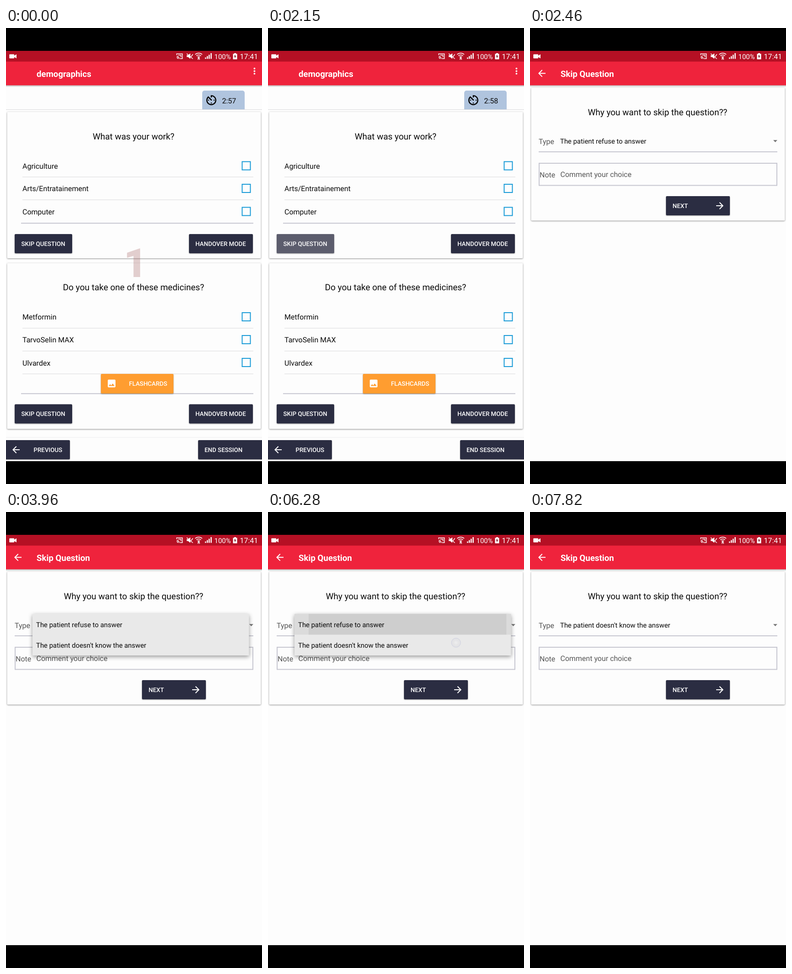
Recreate the animation shown at these times as an HTML page. Size 561x998 px, loop 8000 ms.

```html
<!DOCTYPE html>
<html lang="en">
<head>
<meta charset="utf-8">
<title>Questionnaire</title>
<style>
html, body { margin: 0; width: 100%; height: 100%; overflow: hidden; background: #000; }
svg { display: block; }
text { font: 16px Roboto, sans-serif; fill: #0a0a0a; }
.title { font-size: 18.7px; font-weight: 700; fill: #fff; }
.ask { font-size: 19px; text-anchor: middle; }
.cap { font-size: 13.35px; font-weight: 500; fill: #fff; }
.opt { font-size: 14.9px; }
.lab { fill: #555; }
.white { fill: #fff; }
.card { fill: #fdfdfd; filter: drop-shadow(0 1px 1.5px rgba(0,0,0,.45)); }
.btn { fill: #2b2d42; filter: drop-shadow(0 1px 1px rgba(0,0,0,.4)); }
.box { fill: none; stroke: #1a9bd7; stroke-width: 2; }
.rule { stroke: #d9d9dc; stroke-width: 1.2; }
.end { stroke: #c6c6d0; stroke-width: 2; }

.count, .old, .new, .press, .page, .menu, .tap, .hold, .ripple, .second, .first, .pick {
  animation: 8s linear infinite;
}
.count { animation-name: count; }
.old { animation-name: old; }
.new { animation-name: new; }
.press { animation-name: press; transform-origin: 106px 460px; }
.page { animation-name: page; }
.menu { animation-name: menu; }
.tap1 { animation-name: tap1; }
.tap2 { animation-name: tap2; }
.drag { animation-name: drag; }
.tap3 { animation-name: tap3; }
.hold { animation-name: hold; }
.ripple { animation-name: ripple; transform-origin: 412px 246px; }
.second { animation-name: second; }
.first { animation-name: first; }
.pick { animation-name: pick; }

@keyframes count { 0%, .49% { opacity: 1 } .5%, 1.12% { opacity: .4 } 1.125%, 100% { opacity: 0 } }
@keyframes old { 0%, 19.24% { opacity: 1 } 19.25%, 100% { opacity: 0 } }
@keyframes new { 0%, 19.24% { opacity: 0 } 19.25%, 100% { opacity: 1 } }
@keyframes press {
  0%, 19.5% { opacity: 0; transform: scale(0) }
  19.6% { opacity: 1; transform: scale(.1) }
  23.5%, 30% { opacity: 1; transform: scale(1) }
  31%, 100% { opacity: 0; transform: scale(1) }
}
@keyframes page {
  0%, 27.5% { opacity: 0; transform: translateY(37px); animation-timing-function: cubic-bezier(.36,.66,.04,1) }
  30.6%, 100% { opacity: 1; transform: none }
}
@keyframes menu { 0%, 43.75% { opacity: 0 } 46.5%, 94.5% { opacity: 1 } 97.25%, 100% { opacity: 0 } }
@keyframes tap1 { 0%, 19.24% { opacity: 0 } 19.25%, 21.5% { opacity: 1 } 23%, 100% { opacity: 0 } }
@keyframes tap2 { 0%, 38.99% { opacity: 0 } 39%, 41.5% { opacity: 1 } 43%, 100% { opacity: 0 } }
@keyframes drag {
  0%, 68.12% { opacity: 0; transform: translateY(-30px) }
  68.13%, 72% { opacity: 1; transform: translateY(-30px) }
  78%, 79% { opacity: 1; transform: none }
  84.5% { opacity: 1; transform: translateY(50px) }
  86.25%, 100% { opacity: 0; transform: translateY(52px) }
}
@keyframes tap3 { 0%, 92.24% { opacity: 0 } 92.25%, 94% { opacity: 1 } 95%, 100% { opacity: 0 } }
@keyframes hold { 0%, 68.5% { opacity: 0 } 70%, 79% { opacity: 1 } 82.5%, 100% { opacity: 0 } }
@keyframes ripple {
  0%, 69% { opacity: 0; transform: scaleX(.1) }
  70% { opacity: 1; transform: scaleX(.2) }
  77%, 79% { opacity: 1; transform: none }
  82.5%, 100% { opacity: 0; transform: none }
}
@keyframes second { 0%, 92.25% { opacity: 0 } 93.25%, 100% { opacity: 1 } }
@keyframes first { 0%, 94.49% { opacity: 1 } 94.5%, 100% { opacity: 0 } }
@keyframes pick { 0%, 94.49% { opacity: 0 } 94.5%, 100% { opacity: 1 } }
</style>
</head>
<body>
<svg width="561" height="998" viewBox="0 0 561 998" text-rendering="geometricPrecision">
  <defs>
    <clipPath id="screen"><rect y="73" width="561" height="875"/></clipPath>
    <clipPath id="skip"><rect x="19" y="451" width="126" height="42" rx="2"/></clipPath>
    <linearGradient id="shade" x2="0" y2="1">
      <stop stop-color="#000" stop-opacity=".25"/><stop offset="1" stop-color="#000" stop-opacity="0"/>
    </linearGradient>
    <radialGradient id="glow">
      <stop stop-color="#f0f0f0" stop-opacity=".85"/>
      <stop offset=".5" stop-color="#e4e4e6" stop-opacity=".7"/>
      <stop offset="1" stop-color="#dcdce0" stop-opacity=".45"/>
    </radialGradient>
    <circle id="dot" r="10" fill="url(#glow)" stroke="#c6c9de" stroke-opacity=".75"/>
    <path id="arrow" fill="#fff" d="M8-1H-4.17L1.42-6.59 0-8-8 0 0 8 1.41 6.59-4.17 1H8z"/>
    <rect id="check" class="box" x="517.5" y="-9" width="18" height="18"/>
    <g id="bar">
      <rect y="73" width="561" height="52.5" fill="#ef233c"/>
      <rect y="125.5" width="561" height="4" fill="url(#shade)"/>
    </g>
    <g id="actions">
      <rect class="btn" x="19" y="0" width="126" height="42" rx="2"/>
      <rect class="btn" x="401" y="0" width="140" height="42" rx="2"/>
    </g>
    <g id="actionText">
      <text class="cap" x="33.5" y="25.7">SKIP QUESTION</text>
      <text class="cap" x="415" y="25.7">HANDOVER MODE</text>
    </g>
  </defs>

  <g clip-path="url(#screen)">
    <rect y="73" width="561" height="875" fill="#fdfdfd"/>
    <use href="#bar"/>
    <text class="title" x="67" y="106.5">demographics</text>
    <g fill="#fff">
      <circle cx="544.5" cy="88.7" r="1.9"/><circle cx="544.5" cy="94.3" r="1.9"/><circle cx="544.5" cy="99.9" r="1.9"/>
    </g>

    <path d="M430 178V142a5 5 0 0 1 5-5H518a5 5 0 0 1 5 5V178z" fill="#b0c4de"/>
    <path transform="translate(435.3 143.4) scale(1.22)" d="M11 17c0 .55.45 1 1 1s1-.45 1-1-.45-1-1-1-1 .45-1 1zm0-14v4h2V5.08c3.39.49 6 3.39 6 6.92 0 3.87-3.13 7-7 7s-7-3.13-7-7c0-1.68.59-3.22 1.58-4.42L12 13l1.41-1.41-6.8-6.8v.02C4.42 6.45 3 9.05 3 12c0 4.97 4.02 9 9 9 4.97 0 9-4.03 9-9s-4.03-9-9-9h-1zm7 9c0-.55-.45-1-1-1s-1 .45-1 1 .45 1 1 1 1-.45 1-1zM6 12c0 .55.45 1 1 1s1-.45 1-1-.45-1-1-1-1 .45-1 1z"/>
    <text class="old" x="473.5" y="165">2:57</text>
    <text class="new" x="473.5" y="165">2:58</text>
    <path class="rule" d="M0 178.5H561"/>

    <rect class="card" x="2.5" y="183.5" width="556" height="320.5" rx="2"/>
    <text class="ask" x="279.5" y="243.5">What was your work?</text>
    <text x="36" y="307.5">Agriculture</text>
    <text x="36" y="357.3">Arts/Entratainement</text>
    <text x="36" y="407.7">Computer</text>
    <use href="#check" y="301.5"/><use href="#check" y="351"/><use href="#check" y="401.5"/>
    <path class="rule" d="M36 326H542M36 376H542"/>
    <path class="end" d="M33 427.3H542"/>
    <use href="#actions" y="451"/>
    <g clip-path="url(#skip)"><circle class="press" cx="106" cy="460" r="100" fill="#fff" fill-opacity=".23"/></g>
    <use href="#actionText" y="451"/>

    <rect class="card" x="2.5" y="514.5" width="556" height="363" rx="2"/>
    <text class="ask" x="279.5" y="574">Do you take one of these medicines?</text>
    <text x="36" y="638">Metformin</text>
    <text x="36" y="688">TarvoSelin MAX</text>
    <text x="36" y="738.5">Ulvardex</text>
    <use href="#check" y="632"/><use href="#check" y="682"/><use href="#check" y="732"/>
    <path class="rule" d="M36 657H542M36 707H542M36 757H542"/>
    <path class="end" d="M33 800.3H542"/>
    <rect class="btn" x="208" y="757" width="159" height="43" rx="2" style="fill:#ff9d30"/>
    <path transform="translate(220.2 766.7) scale(.94)" fill="#fff" d="M21 19V5c0-1.1-.9-2-2-2H5c-1.1 0-2 .9-2 2v14c0 1.1.9 2 2 2h14c1.1 0 2-.9 2-2zM8.5 13.5l2.5 3.01L14.5 12l4.5 6H5l3.5-4.5z"/>
    <text class="cap" x="269.5" y="783.2">FLASHCARDS</text>
    <use href="#actions" y="823.5"/>
    <use href="#actionText" y="823.5"/>

    <path d="M0 896H561" stroke="#ececee"/>
    <rect class="btn" x="-3" y="902" width="143" height="42" rx="2"/>
    <rect class="btn" x="421" y="902" width="143" height="42" rx="2"/>
    <use href="#arrow" x="22" y="923"/>
    <text class="cap" x="60.5" y="927.8">PREVIOUS</text>
    <text class="cap" x="435" y="927.8">END SESSION</text>

    <text class="count" x="283.5" y="544.5" text-anchor="middle" style="font-size:88px;font-weight:900;fill:#9a5050;fill-opacity:.27">1</text>
    <g class="tap tap1"><use href="#dot" x="106" y="460"/></g>

    <g class="page">
      <rect y="73" width="561" height="912" fill="#fdfdfd"/>
      <use href="#bar"/>
      <use href="#arrow" x="26" y="99.3"/>
      <text class="title" x="67" y="106.5">Skip Question</text>

      <rect class="card" x="2.5" y="130.5" width="556" height="291" rx="2"/>
      <text class="ask" x="279.5" y="191">Why you want to skip the question??</text>
      <text class="lab" x="19" y="253.5">Type</text>
      <text class="opt first" x="66" y="253.3">The patient refuse to answer</text>
      <text class="opt pick" x="66" y="253.3">The patient doesn't know the answer</text>
      <path d="M533 245.3H542L537.5 250z" fill="#757575"/>
      <path class="end" d="M19 271H542"/>
      <rect x="20" y="296" width="521" height="48.5" fill="none" class="end"/>
      <text class="lab" x="21" y="326.5">Note</text>
      <text class="lab" x="66.5" y="326">Comment your choice</text>
      <rect class="btn" x="298" y="368" width="140" height="42" rx="2"/>
      <text class="cap" x="312.5" y="393.8">NEXT</text>
      <use href="#arrow" transform="translate(416 389) scale(-1 1)"/>

      <g class="menu">
        <rect x="58" y="223" width="474.5" height="91" fill="#e9e9e9" style="filter:drop-shadow(0 3px 5px rgba(0,0,0,.4))"/>
        <rect class="hold" x="58" y="223" width="474.5" height="45.5" fill-opacity=".06"/>
        <rect class="ripple" x="89" y="223" width="433.5" height="45.5" fill-opacity=".06"/>
        <rect class="second" x="58" y="268.5" width="474.5" height="45.5" fill-opacity=".1"/>
        <text class="opt" x="66" y="252.2">The patient refuse to answer</text>
        <text class="opt" x="66" y="297.2">The patient doesn't know the answer</text>
      </g>
      <g class="tap tap2"><use href="#dot" x="412" y="248"/></g>
      <g class="tap drag"><use href="#dot" x="412" y="286"/></g>
      <g class="tap tap3"><use href="#dot" x="412" y="292"/></g>
    </g>
  </g>

  <rect y="50" width="561" height="23.5" fill="#b51024"/>
  <g fill="#fff">
    <path d="M8.5 57.5H17a1.2 1.2 0 0 1 1.2 1.2V60.5L23 57.5V66.5L18.2 63.5V65.3A1.2 1.2 0 0 1 17 66.5H8.5A1.2 1.2 0 0 1 7.3 65.3V58.7A1.2 1.2 0 0 1 8.5 57.5z"/>
    <path d="M396 59.5H399L404 55.5V67.5L399 63.5H396z"/>
    <path d="M436 67.5h2.5v-3H436zM440 67.5h2.5v-6H440zM444 67.5h2.5v-9H444zM448.3 67.5h2.5V55h-2.5z"/>
    <path d="M497.5 56.5H500V55H504V56.5H506.5V68.5H497.5z"/>
    <circle cx="422.3" cy="65.5" r="1.8"/>
  </g>
  <g fill="none" stroke="#fff" stroke-width="1.5">
    <path d="M374 59V56.5H386.5V67H381M374 61.5a6 6 0 0 1 5.5 6M374 64.5a3 3 0 0 1 2.7 3M377.5 59.5H383.5V64"/>
    <path d="M396 56L409.5 67.5M405.5 63L409.5 57.5"/>
    <path d="M414.5 58a11.5 11.5 0 0 1 15.5 0M417 61a8 8 0 0 1 10.500 0M419.500 63.500a4.500 4.500 0 0 1 5.500 0M421 66.500V69.500M424 66.500V69.500"/>
  </g>
  <path d="M502.500 58L499.500 62.500H501.500L501 66.500L504.500 61.500H502.500z" fill="#7a1020"/>
  <text class="white" x="456.500" y="67.700" style="font-size:15px">100%</text>
  <text class="white" x="512.500" y="67.800">17:41</text>
</svg>
</body>
</html>
```
